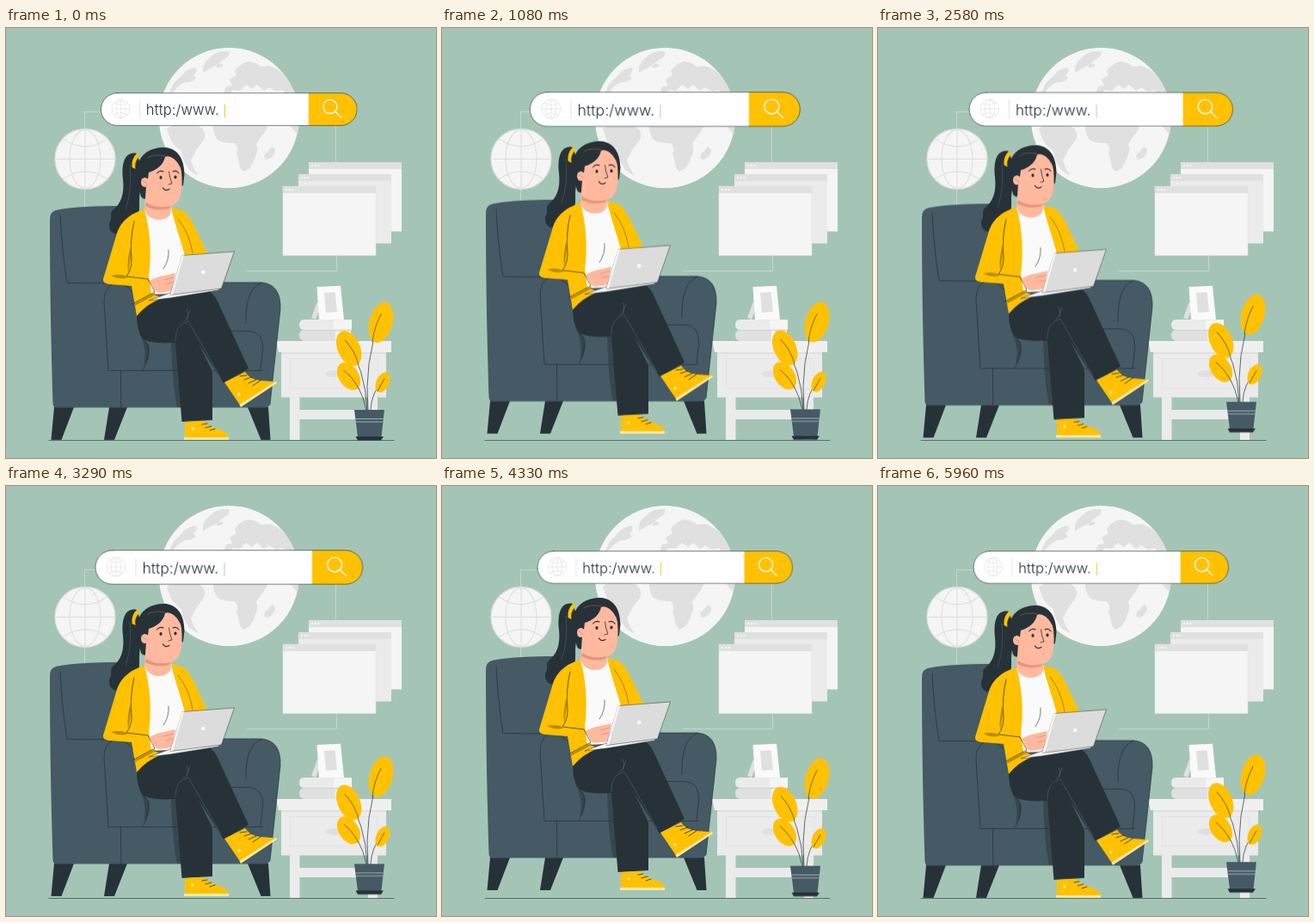
An HTML page without scripts for the animation above (6000 ms loop, 500 by 500 pixels).

```html
<!DOCTYPE html>
<html lang="en">
<head>
<meta charset="utf-8">
<title>Browsing in an armchair</title>
<style>
  html, body { margin: 0; width: 100%; height: 100%; overflow: hidden; background: #a4c5b6; }
  svg { display: block; width: 100vw; height: 100vh; }
  text { font: 300 16.5px Inter, "Open Sans", sans-serif; letter-spacing: .1px; }

  .line { fill: none; stroke: #263238; stroke-width: .7; stroke-linecap: round; stroke-linejoin: round; }
  .pale { fill: none; stroke: #e0e0e0; }
  .yellow { fill: #ffc100; }
  .dark { fill: #263238; }
  .slate { fill: #455a64; }
  .shade { fill: #37474f; }
  .skin { fill: #ffb99e; }
  .sole { fill: #ffe9a3; }
  .g1 { fill: #f5f5f5; }
  .g2 { fill: #ebebeb; }
  .g3 { fill: #e0e0e0; }

  .sitter { animation: float 3s linear -20ms infinite; }
  .plant { animation: sway 6s linear -20ms infinite; }
  .bar { transform-origin: 259.3px 94.5px; animation: beat 6s linear -20ms infinite; }
  .caret { stroke: #ffc100; animation: caret 6s step-end -20ms infinite; }

  @keyframes float { 50% { transform: translateY(-10px); } }
  /* one second of rest, then the same float, cut off by the loop */
  @keyframes sway {
    0%, 16.667%, 66.667% { transform: translateY(0); }
    41.667%, 91.667% { transform: translateY(-10px); }
    100% { transform: translateY(-6.667px); }
  }
  @keyframes beat {
    0%, 30%, 40%, 60%, 100% { transform: scale(1); }
    10%, 50% { transform: scale(1.1); }
  }
  @keyframes caret {
    0%, 30%, 60%, 100% { stroke: #ffc100; }
    2%, 41% { stroke: #c9c9c9; }
  }
</style>
</head>
<body>
<svg viewBox="0 0 500 500">
  <defs>
    <clipPath id="disc"><circle cx="259.3" cy="104.5" r="81.7"/></clipPath>
    <clipPath id="pill"><rect x="111" y="75.700" width="296.600" height="37.600" rx="18.800"/></clipPath>
    <g id="pane">
      <path d="M0 0H108V8H0Z" class="g3"/>
      <g fill="#fafafa"><circle cx="4" cy="4" r="1.1"/><circle cx="7.8" cy="4" r="1.1"/><circle cx="11.6" cy="4" r="1.1"/></g>
    </g>
    <g id="grid">
      <path d="M0-34V34M-34 0H34M-25-23Q0-6 25-23M-25 23Q0 6 25 23"/>
      <ellipse rx="18" ry="34"/>
    </g>
  </defs>

  <!-- earth -->
  <g clip-path="url(#disc)">
    <circle cx="259.3" cy="104.5" r="81.7" class="g1"/>
    <g class="g3">
      <path d="M229 46C231 38 236 36 241 31Q250 26 259 27Q261 31 256 35C251 37 248 42 242 45Q234 49 229 52Z"/>
      <path d="M245 43Q250 40 253 43Q250 47 245 46Z"/>
      <path d="M194 66C198 60 203 58 206 53Q214 46 221 46Q223 51 218 55L221 59Q214 64 208 63Q200 67 195 74L189 78Z"/>
      <path d="M253 76L256 68L263 67L260 60L268 55L266 50Q271 42 281 39Q292 40 296 45L306 44Q322 48 334 70L342 90H329L322 72L314 74L306 69L300 73L292 66L286 71L279 66L272 73L264 72L258 78Z"/>
      <path d="M187 117Q194 111 208 112L224 114Q233 119 231 128C228 135 221 139 219 147L215 153Q217 163 224 171Q215 169 210 160Q204 151 204 143Q195 137 191 129Z"/>
      <path d="M241 108H300L304 115Q301 122 297 126L291 135Q294 143 290 149Q288 158 282 164L276 167Q271 163 271 156L268 146Q271 139 266 134Q252 134 246 130Q240 123 241 108Z"/>
      <path d="M309 138Q313 139 313 144Q310 152 303 153Q299 152 301 146Q305 144 309 138Z"/>
      <path d="M328 108H342V124Q334 122 328 108Z"/>
    </g>
  </g>

  <!-- connectors and small globe -->
  <path d="M110 97.5H91.5V117M91.5 188V230M383.500 114V157M384.500 265V282.500H280" class="pale" stroke-width=".6"/>
  <g transform="translate(92 152.300)">
    <circle r="35" class="g1" stroke="#e0e0e0" stroke-width="1.300"/>
    <use href="#grid" class="pale" stroke-width="1.200"/>
  </g>

  <!-- windows -->
  <path d="M352 156H460V236.500H352Z" class="g1"/>
  <use href="#pane" x="352" y="156"/>
  <path d="M340 170H448V250.500H340Z" class="g2"/>
  <use href="#pane" x="340" y="170"/>
  <path d="M322 184H430V264.500H322Z" class="g1" stroke="#e0e0e0" stroke-width=".5"/>
  <use href="#pane" x="322" y="184"/>

  <!-- search bar -->
  <g class="bar">
    <g clip-path="url(#pill)">
      <path d="M110 75H352V114H110Z" fill="#fff"/>
      <path d="M351.500 75H409V114H351.500Z" class="yellow"/>
    </g>
    <rect x="111" y="75.700" width="296.600" height="37.600" rx="18.800" class="line" style="stroke-width:.6"/>
    <g transform="translate(134 94) scale(.31)" class="pale">
      <circle r="34" stroke-width="2"/><use href="#grid" stroke-width="2"/>
    </g>
    <path d="M156 84V105" class="pale" stroke-width=".8"/>
    <text x="163.200" y="101" fill="#263238">http:/www.</text>
    <path d="M254.300 89V104" class="caret" stroke-width="1"/>
    <g fill="none" stroke="#fff" stroke-width="1.300" stroke-linecap="round">
      <circle cx="376.500" cy="91.500" r="8"/><path d="M382.300 97.300L389.200 104"/>
    </g>
  </g>

  <!-- side table, books and picture -->
  <path d="M330 429H341.500V444H421V429H432V479H421V455H341.500V479H330Z" class="g2"/>
  <path d="M320 376H442V429.500H320Z" class="g2"/>
  <path d="M320 376H442V379H320Z" class="g3"/>
  <path d="M330.500 384.500H432V419H330.500Z" class="pale" stroke-width=".8"/>
  <path d="M314 364H448V377H317Z" fill="#f0f0f0"/>
  <ellipse cx="382" cy="402" rx="10" ry="4" class="g3"/>
  <path d="M362 318L355 337L360 339L366 324Z" class="g3"/>
  <path d="M361.500 301L389 299.700L393 339H364Z" fill="#fafafa"/>
  <path d="M370 308L382.500 307L385 330L372 331Z" class="g3"/>
  <path d="M347 339H402V351H347Q341 351 341 345T347 339Z" class="g2"/>
  <path d="M347 351.500H401V364H347Q341 363 341 357T347 351.500Z" class="g3"/>
  <path d="M381 340H402V350H381ZM383 352.500H401V363H383Z" class="g1"/>
  <path d="M345 351.200H402" class="pale" stroke-width=".7"/>

  <path d="M50 479.500H451" class="line" style="stroke-width:.6"/>

  <!-- potted plant -->
  <g class="plant">
    <path d="M421 444Q416 390 435 338M420 444Q418 396 395 364M419 444Q412 412 394 400M424 444Q425 424 438 410" class="line"/>
    <g class="yellow">
      <ellipse rx="13.500" ry="24" transform="translate(436 342.500) rotate(15)"/>
      <ellipse rx="13" ry="21.500" transform="translate(398.700 372.500) rotate(-24)"/>
      <ellipse rx="11.500" ry="17.500" transform="translate(398.500 405) rotate(-33)"/>
      <ellipse rx="7.500" ry="12.500" transform="translate(438 412) rotate(25)"/>
    </g>
    <path d="M426 365Q428 348 436 333M410 391Q405 374 394 363M410 419Q403 406 393 398M432 422L440 408" class="line" style="stroke-width:.6"/>
    <path d="M405 444H440L436.500 475.500H409Z" class="slate"/>
    <path d="M406.300 454.500H438.700M406.700 458H438.300" fill="none" stroke="#dfe5e7" stroke-width=".6"/>
    <path d="M406.500 475H439L436 479.500H409Z" class="dark"/>
  </g>

  <!-- armchair and woman -->
  <g class="sitter">
    <path d="M56 441H79L64.500 479H52.500ZM120 441H141L126 479H114ZM281 441H305L307.500 479H296.500Z" class="dark"/>
    <path d="M51 222Q51 213 60 211.500C80 208 105 207 130 207Q150 207 160 218L200 296H297Q320 298 319 327L307 437Q306 441.500 300 441.500H58Q54.500 441 54.500 436C53 380 51 320 51 222Z" class="slate"/>
    <path d="M192 366H200L208 441H199Q194 420 192 366Z" class="shade"/>
    <path d="M158 361Q169 366 166.500 380Q165 390 160 393Q164 378 158 361Z" class="shade"/>
    <path d="M63 218Q65 260 71 296.500L125 297Q114 302 114 318L119 398.500H199M241 398.500H298M125 297C148 297 155 316 157 342Q158 360 165 369Q167 386 159 398M133.500 399L133.800 441M279 344Q278 303 297 296.500M244 352.500H283Q300 354 298.500 375L296 398.500M232 296H297Q320 298 319 327L307 438" class="line"/>

    <!-- ponytail -->
    <path d="M152 146C138 143 134 158 136 176C138 194 133 205 125 211C119 216 125 221 120 227Q119 240 132 240C149 239 156 224 155 202C155 187 160 180 159 166Z" class="dark"/>
    <path d="M144 160Q147 190 139 211" class="line" style="stroke:#455a64"/>

    <!-- shirt, head, neck -->
    <path d="M160 212L194 209L217 262L205 266L192 309L166 310Z" fill="#fafafa"/>
    <path d="M153 160C157 144 172 138 186 139C200 141 207 152 207.500 170L206 183L190 190L168 190L164 198Q159 200 157 196Q152 178 153 160Z" class="dark"/>
    <path d="M163 184L161 211Q166 224 180 223Q192 221 192 212L191 200Z" class="skin"/>
    <path d="M163 203Q175 211 191 207L190 210Q175 214 162 207Z" fill="#e8957a"/>
    <path d="M166 168Q182 163 185 150Q189 148 195 152Q205 160 204.500 174C205 188 204 203 193 206.500C180 209 167 201 163 191Z" class="skin"/>
    <ellipse cx="161.500" cy="179.500" rx="4.500" ry="5.500" class="skin"/>
    <path d="M159 178Q162 178 164 182M165 151Q173 146 185 149" class="line" style="stroke:#b76e58;stroke-width:.5"/>
    <path d="M152 146Q156 147 154.500 150Q149 156 150.500 164L146.500 162Q145.500 152 152 146Z" class="yellow"/>
    <g class="dark"><ellipse cx="180" cy="174" rx="1.600" ry="2"/><ellipse cx="197" cy="173.500" rx="1.600" ry="2"/></g>
    <path d="M175.500 169Q179 165 183 167M194 167Q198 165 201 169" class="line" style="stroke-width:1.100"/>
    <path d="M189.500 167Q190 174 193 181L189 182" class="line" style="stroke-width:.8"/>
    <path d="M182.500 186Q185 190.500 190 187.500" class="line" style="stroke-width:1.200"/>
    <path d="M189 258Q190 270 183 280" class="line" style="stroke-width:.6"/>

    <!-- trousers -->
    <path d="M152 334L170 315L232 304Q241 307 246 318L282 396L253 413L224 367L240 400V456L204.500 458L197 366Q167 368 158 361Q152 350 152 334Z" class="dark"/>
    <path d="M197 364Q196 345 212 341L250 407M210 327Q215 338 207 341M214 328L210 338" class="line" style="stroke:#53666f;stroke-width:.6"/>

    <!-- cardigan -->
    <path d="M192 209L205 212C214 217 221 235 234 262L208 265C204 248 197 232 192 209Z" class="yellow"/>
    <path d="M161 211C146 215 132 225 128 242L113 292Q112 297 120 298L146 300L152 335Q163 321 182 314L169 309L166 288C170 261 167 233 161 211Z" class="yellow"/>
    <path d="M149 225Q144 245 146 270Q146 281 140 289L165 292L173 307L147 321" class="line"/>
    <path d="M146 250Q145 270 142 285Q140 269 146 250ZM122 288Q134 285 142 290Q134 294 122 288ZM149 320.500L173 308L174 310L150 323Z" fill="#b98d05"/>
    <path d="M200 222Q213 238 217 262" class="line" style="stroke-width:.4"/>

    <!-- hands and laptop -->
    <path d="M167 294Q176 289 184 288L197 285L193 306L178 308Q171 307 167 294Z" class="skin"/>
    <path d="M184 293L195 290M186 298L194 296" class="line" style="stroke:#d9826a;stroke-width:.6"/>
    <path d="M166 317L191 308L249 302L247 305L191 314Z" class="g1" stroke="#263238" stroke-width=".5"/>
    <path d="M205 264.500L265.500 260L250.500 303L191 310.500Z" fill="#dcdcdc" stroke="#263238" stroke-width=".5"/>
    <path d="M204.500 264.500L207 264.300L194 310L191 310.500Z" class="g1"/>
    <circle cx="229.300" cy="284" r="2.300" fill="#fafafa"/>

    <!-- shoes -->
    <path d="M208 458L230 457Q238 465 251 468Q259 471 259 478H208Z" class="yellow"/>
    <path d="M207 476H259V479H207Z" class="sole"/>
    <path d="M254 412L278 400Q284 409 296 410L315 411.500L273 440Z" class="yellow"/>
    <path d="M271.500 438L314 411L315 413L273 441Z" class="sole"/>
    <path d="M228 461L234 460M232 465L239 463M237 468L243 466M272 405L280 404M277 409L286 406M282 413L291 409M287 416L296 410" class="line" style="stroke-width:.8"/>
    <circle cx="217" cy="466" r="1.800" class="sole"/><circle cx="271" cy="426" r="1.800" class="sole"/>
  </g>
</svg>
</body>
</html>
```
